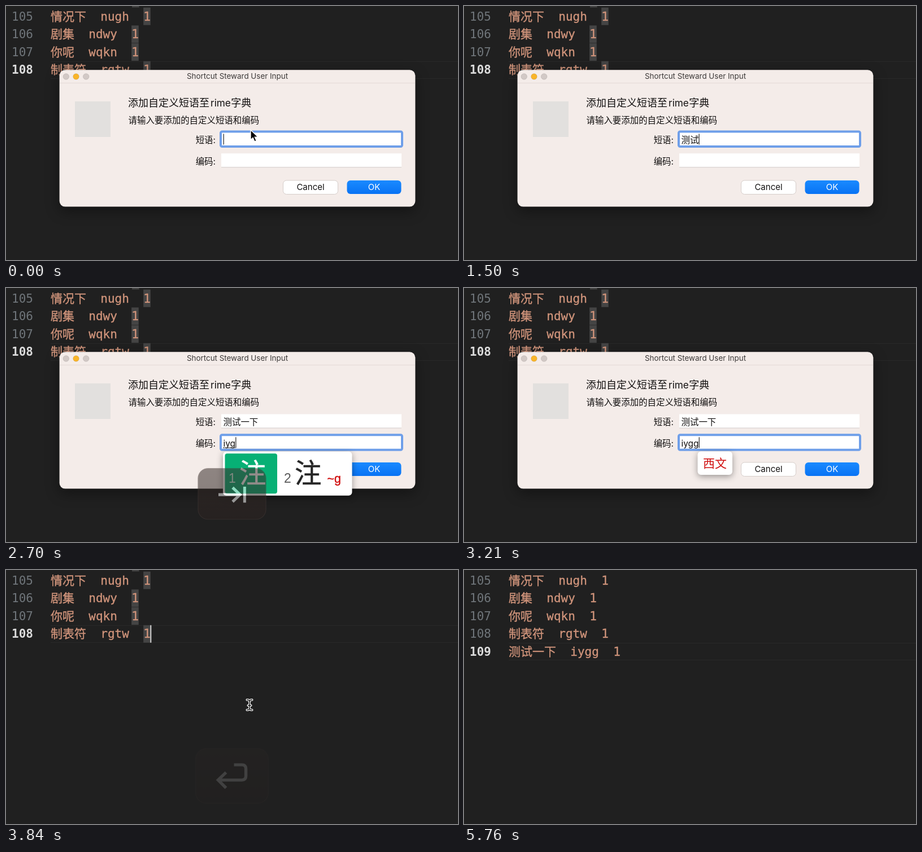
An HTML page that plays this animation: 800 px wide and 450 px high, repeating every 5790 ms.

```html
<!DOCTYPE html>
<html lang="zh">
<head>
<meta charset="utf-8">
<title>Custom phrase</title>
<style>
html, body { margin: 0; width: 100%; height: 100%; overflow: hidden; background: #202020; }
svg { display: block; width: 800px; height: 450px; }
text { white-space: pre; }
.code { font: 21px "DejaVu Sans Mono", "Noto Sans CJK SC", "Noto Sans CJK", monospace; fill: #d0947b; stroke: #d0947b; stroke-width: .35px; }
.number { fill: #6f757a; stroke: none; }
.number.active { fill: #dcdcdc; font-weight: 700; }
.ui { font-family: Inter, "Noto Sans CJK SC", "Noto Sans CJK", sans-serif; fill: #121010; }
.title { fill: #3d3a39; }
.pick { font-family: "Liberation Sans", "Noto Sans CJK SC", "Noto Sans CJK", sans-serif; }
.float { filter: drop-shadow(0 3px 6px rgba(0,0,0,.38)); }
</style>
</head>
<body>
<svg id="stage" viewBox="0 0 800 450">
  <defs>
    <linearGradient id="blue" x2="0" y2="1"><stop stop-color="#1a8aff"/><stop offset="1" stop-color="#0873f4"/></linearGradient>
    <linearGradient id="brown" x2="0" y2="1"><stop stop-color="#3a2f2c"/><stop offset="1" stop-color="#2c2321"/></linearGradient>
    <path id="ibeam" d="M426.500 230q4.500 0 4.500 3v12q0 3-4.500 3M435.500 230q-4.500 0-4.500 3v12q0 3 4.500 3M428.500 240h5"/>
  </defs>
  <rect width="800" height="450" fill="#202020"/>
  <g id="editor"></g>
  <g id="dialog"></g>
  <g id="panel"></g>
  <g id="key"></g>
  <path id="arrow" d="M433 219.500v17.500l4-3.700 3 6.800 3.200-1.400-3-6.600h5.600z" fill="#000" stroke="#fff" stroke-width="1.300"/>
  <g id="beam" fill="none" stroke-linecap="round">
    <use href="#ibeam" stroke="#fff" stroke-width="4"/>
    <use href="#ibeam" stroke="#111" stroke-width="1.500"/>
  </g>
</svg>
<script>
const LOOP = 5790;
const TAB = 2250, SWITCH = 3060, ENTER = 3630, INSERT = 4350;
const el = id => document.getElementById(id);
const clamp = v => Math.max(0, Math.min(1, v));
const between = (t, a, b) => t >= a && t < b;
const show = (node, on) => node.setAttribute('display', on ? 'inline' : 'none');

const rect = (x, y, w, h, fill, r = 0, extra = '') =>
  `<rect x="${x}" y="${y}" width="${w}" height="${h}" rx="${r}" fill="${fill}" ${extra}/>`;
const text = (x, y, size, str, extra = '') =>
  `<text x="${x}" y="${y}" font-size="${size}" ${extra}>${str}</text>`;

// Each step: [time, committed text, code being composed]
const phraseSteps = [
  [0, '', ''], [1020, '', 'i'], [1170, '', 'im'], [1320, '', 'imy'], [1440, '测试', ''],
  [2010, '测试', 'g'], [2070, '测试', 'gg'], [2130, '测试', 'ggg'], [2190, '测试一下', '']
];
const codeSteps = [
  [0, '', ''], [2460, '', 'i'], [2580, '', 'iy'], [2700, '', 'iyg'], [2820, '', 'iygg'], [SWITCH, 'iygg', '']
];
const candidates = {
  i: '不 水~i 小~h 法~f', im: '油 测~j 润~g', imy: '测试~a', iy: '注 洲~t 泣~u',
  iyg: '注 注~g', iygg: '注', g: '一 五~g 下~h 不~i', gg: '五 王~g 于~f', ggg: '王 一下~h'
};
const stepAt = (steps, t) => steps.filter(s => s[0] <= t).pop();

// Editor
const lines = [['情况下', 'nugh'], ['剧集', 'ndwy'], ['你呢', 'wqkn'], ['制表符', 'rgtw'], ['测试一下', 'iygg']];
const CJK = 21, CELL = 12.643, PITCH = 31.65, LEFT = 79;
const countX = i => LEFT + lines[i][0].length * CJK + 8 * CELL;
const rowTop = i => 2.8 + i * PITCH;

function drawEditor(t) {
  const inserted = t >= INSERT, current = inserted ? 4 : 3;
  const top = Math.round(rowTop(current)) + .5;
  let out = `<path d="M${LEFT} ${top}H800M${LEFT} ${top + 30}H800" stroke="#292929"/>`;
  if (!inserted) out += rect(223, 0, 12.6, 2.5, '#444');
  lines.slice(0, current + 1).forEach(([word, code], i) => {
    const y = 25.5 + i * PITCH;
    if (!inserted) out += rect(countX(i), rowTop(i), CELL, 31, '#444');
    out += text(10, y, 21, 105 + i, `class="code number ${i === current ? 'active' : ''}"`);
    out += text(LEFT, y, 21, `${word}  ${code}  1`, 'class="code"');
  });
  if (between(t, 3660, 4520) || between(t, 5020, 5520))
    out += rect(countX(current) + CELL - .5, rowTop(current), 2, 31, '#d4d4d4');
  el('editor').innerHTML = out;
}

// Dialog
const FIELD = { x: 381, w: 319, h: 24.5, y: [223.5, 261.2] };

el('dialog').innerHTML =
  rect(94.6, 113.2, 629.8, 242.4, '#f4ece9', 10, 'style="filter:drop-shadow(0 8px 12px rgba(0,0,0,.4))"') +
  '<path d="M95 136.500H724" stroke="#e3dad7"/>' +
  ['#d2c9c6', '#f9b52a', '#d2c9c6'].map((c, i) =>
    `<circle cx="${106.3 + i * 17.7}" cy="125" r="5.300" fill="${c}" stroke="#000" stroke-opacity=".1"/>`).join('') +
  rect(122, 169, 63, 63, '#e2e0de') +
  '<g class="ui">' +
  text(409.5, 129.3, 13.4, 'Shortcut Steward User Input', 'text-anchor="middle" class="title"') +
  text(216, 177.5, 18, '添加自定义短语至') + text(362, 177.5, 17.2, 'rime') + text(398.2, 177.5, 18, '字典') +
  text(216.5, 208, 15.45, '请输入要添加的自定义短语和编码') +
  text(371, 243, 15.45, '短语:', 'text-anchor="end"') +
  text(371, 280.7, 15.45, '编码:', 'text-anchor="end"') +
  rect(490.5, 309, 97, 24.5, '#fff', 6, 'stroke="#d5cdca"') +
  rect(603.5, 309, 96, 24, 'url(#blue)', 6) +
  text(539, 326.3, 15, 'Cancel', 'text-anchor="middle"') +
  text(651.5, 326.3, 15, 'OK', 'text-anchor="middle" style="fill:#fff"') +
  '</g>' +
  FIELD.y.map((y, i) =>
    rect(FIELD.x, y, FIELD.w, FIELD.h, '#fff') +
    `<path d="M381 ${y + FIELD.h}h319" stroke="#d3ccca"/>` +
    `<text id="value${i}" class="ui" x="384.500" y="${y + 19.3}" font-size="15.450"></text>`).join('') +
  '<rect id="ring" fill="none" stroke="#6f9fe9"/>' +
  '<path id="underline" stroke="#222" stroke-width="1.500" stroke-dasharray="2 1"/>' +
  '<path id="caret" stroke="#333" stroke-width="1.300"/>';

const widthOf = (node, count) => count ? node.getSubStringLength(0, count) : 0;

function drawDialog(t) {
  const fade = 1 - clamp((t - 3620) / 130);
  el('dialog').setAttribute('opacity', fade);
  show(el('dialog'), fade > 0);
  const states = [stepAt(phraseSteps, t), stepAt(codeSteps, t)];
  states.forEach(([, done, typing], i) => { el('value' + i).textContent = done + typing; });

  const active = t < TAB ? 0 : 1, y = FIELD.y[active];
  drawRing(t, y, active ? clamp((t - TAB) / 200) : 1);

  const [, done, typing] = states[active], value = el('value' + active);
  const start = 384.5 + widthOf(value, done.length);
  const end = 384.5 + widthOf(value, done.length + typing.length);
  el('caret').setAttribute('d', `M${end + .7} ${y + 3}v19`);
  show(el('caret'), t < ENTER && !between(t, 150, 600));
  el('underline').setAttribute('d', `M${start} ${y + 21.7}H${end}`);
  show(el('underline'), typing);

  let out = '';
  if (typing) out = candidatePanel(start - .5, y + 28.6, candidates[typing].split(' '));
  else if (between(t, SWITCH + 30, 3480))
    out = rect(413.5, 289.5, 61.5, 41.5, '#fff', 6, 'class="float"') +
      text(423, 318.3, 21, '西文', 'class="pick" fill="#d00d0d"');
  el('panel').innerHTML = out;
}

// The focus ring shrinks onto the field and overlaps its edge slightly.
function drawRing(t, y, settle) {
  const outer = 3 + 20 * (1 - settle) ** 2, inner = 1;
  const pad = (outer - inner) / 2, ring = el('ring');
  const box = {
    x: FIELD.x - pad, y: y - pad, width: FIELD.w + 2 * pad, height: FIELD.h + 2 * pad,
    rx: outer / 2 + 1, 'stroke-width': outer + inner, opacity: settle ** 1.3
  };
  for (const name in box) ring.setAttribute(name, box[name]);
  show(ring, t < ENTER);
}

function candidatePanel(left, top, items) {
  let x = left + 3.5, cells = '';
  items.forEach((item, i) => {
    const [word, hint] = item.split('~'), first = i === 0;
    const wordWidth = 47.5 * word.length;
    const hintWidth = hint ? (hint === 'i' ? 24 : 31) : 0;
    const hintColor = first ? '#fff' : '#d00d0d', wordColor = first ? '#fff' : '#262626';
    if (first) cells += rect(x, top + 3.5, 45 + wordWidth + hintWidth, 71, '#07b075', 4);
    cells += text(x + 6.5, top + 55, 23, i + 1, `fill="${first ? '#d8f5e8' : '#5c5c5c'}"`);
    cells += text(x + 25.5, top + 55, 47.5, word, `fill="${wordColor}" stroke="${wordColor}" stroke-width=".5"`);
    if (hint) cells += text(x + 35.5 + wordWidth, top + 55, 21.5, '~' + hint, `fill="${hintColor}" stroke="${hintColor}" stroke-width=".4"`);
    x += 50.5 + wordWidth + hintWidth;
  });
  return `<g class="pick">${rect(left, top, x - left - 2, 78, '#fff', 6, 'class="float"')}${cells}</g>`;
}

// Pressed keys
const icons = {
  tab: 'M378 366H412M401 354.500L413 366 401 377.500M420.500 353V379',
  enter: 'M380 371H415Q421 371 421 365V354Q421 348 415 348H403M391 359.500L379 371 391 383'
};

function drawKey(t) {
  const key = [['tab', TAB, 2610], ['enter', 3540, 3670]].find(k => between(t, k[1], k[2] + 200));
  let out = '';
  if (key) {
    const [name, start, end] = key, leaving = clamp((t - end) / 200);
    const alpha = clamp((t - start + 30) / 60) * (1 - leaving);
    const scale = 1 + .2 * leaving;
    out = `<g opacity="${alpha}" transform="translate(400 364.700) scale(${scale}) translate(-400 -364.700)">` +
      rect(345, 323.5, 110, 82.5, 'url(#brown)', 16, 'stroke="#463a37"') +
      `<path d="${icons[name]}" fill="none" stroke="#fff" stroke-width="4.600"/></g>`;
  }
  el('key').innerHTML = out;
}

function render(t) {
  drawEditor(t);
  drawDialog(t);
  drawKey(t);
  show(el('arrow'), t < 1020);
  show(el('beam'), between(t, 3660, 5190));
}

const origin = performance.now();
function frame() {
  render((performance.now() - origin) % LOOP);
  requestAnimationFrame(frame);
}
frame();
</script>
</body>
</html>
```
